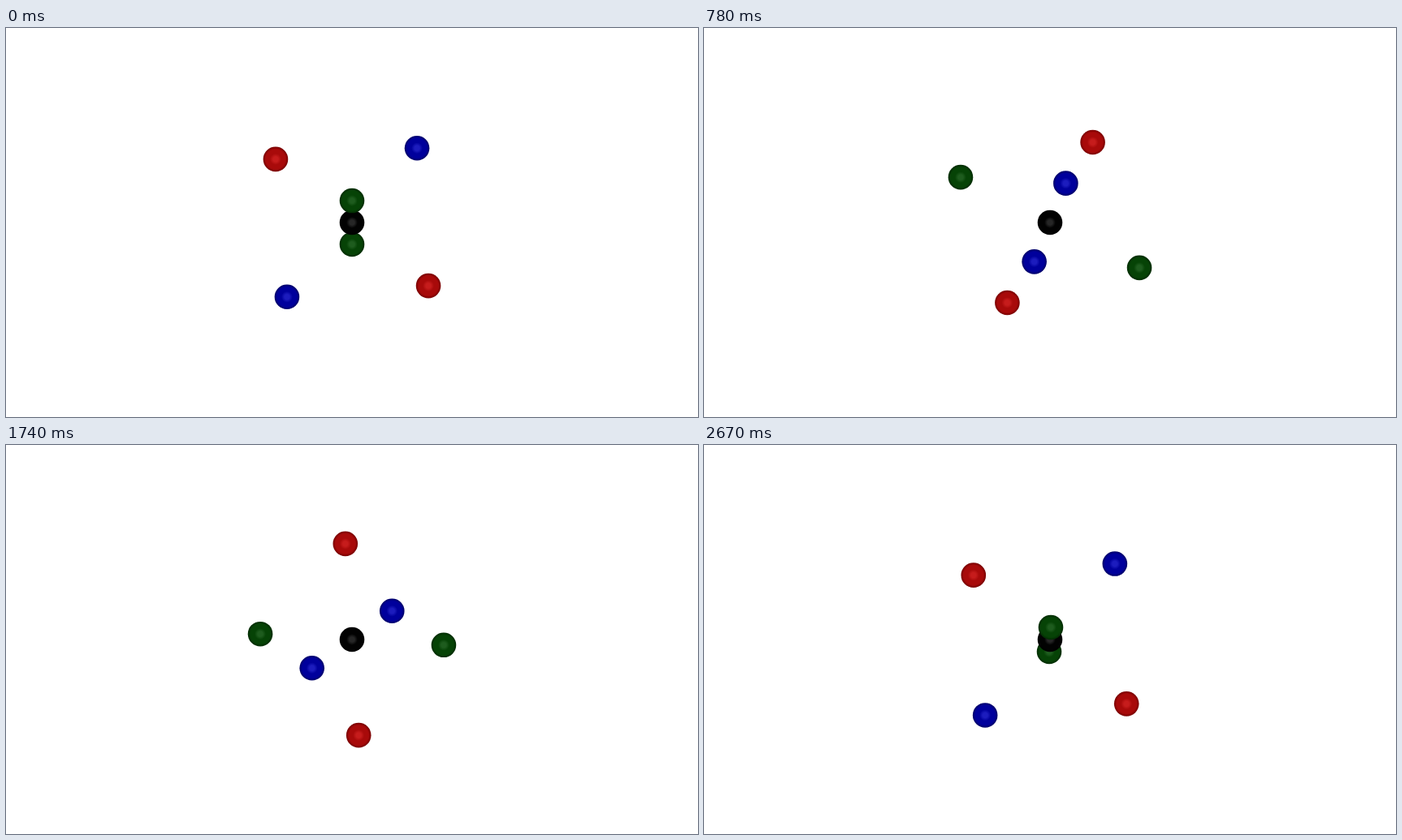
Write an HTML page with a canvas that moves like this. It is 852x480 px and loops after 2.7 s.

```html
<!DOCTYPE html>
<html lang="en">
<head>
<meta charset="utf-8">
<title>Rotating octahedron</title>
<style>
  html, body { margin: 0; width: 100%; height: 100%; overflow: hidden; background: #fff; }
  canvas { display: block; }
</style>
</head>
<body>
<canvas id="stage" width="852" height="480"></canvas>
<script>
const ctx = document.getElementById('stage').getContext('2d');
const W = 852, H = 480, ORBIT = 123.5, BALL = 15.3;
const LOOP = 2700, STEP = 30, STEPS = LOOP / STEP;

// Highlight, body and rim colour of each ball
const RED = ['#c61c1c', '#a80a0a', '#760000'];
const GREEN = ['#1e5c1e', '#064306', '#022a02'];
const BLUE = ['#1c1cbe', '#00009c', '#000066'];
const BLACK = ['#262626', '#020202', '#000000'];

// Orthographic camera: heading and elevation above the ground plane
const HEADING = 40.4 * Math.PI / 180, TILT = 77.4 * Math.PI / 180;

function project([x, y, z]) {
  const right = x * Math.cos(HEADING) + y * Math.sin(HEADING);
  const away = y * Math.cos(HEADING) - x * Math.sin(HEADING);
  return {
    x: W / 2 + ORBIT * right,
    y: H / 2 - ORBIT * (away * Math.sin(TILT) + z * Math.cos(TILT)),
    depth: z * Math.sin(TILT) - away * Math.cos(TILT)
  };
}

function ball({ x, y, tones }) {
  const [light, body, rim] = tones;
  const fill = ctx.createRadialGradient(x, y, 0, x, y, BALL);
  fill.addColorStop(0, light);
  fill.addColorStop(0.2, light);
  fill.addColorStop(0.45, body);
  fill.addColorStop(0.78, body);
  fill.addColorStop(1, rim);
  ctx.fillStyle = fill;
  ctx.beginPath();
  ctx.arc(x, y, BALL, 0, 2 * Math.PI);
  ctx.fill();
}

function draw(time) {
  const turn = Math.floor((time % LOOP) / STEP) / STEPS * 2 * Math.PI;
  const c = Math.cos(turn), s = Math.sin(turn);

  // Unit axes turned about y, then about x, by the same angle
  const axes = [
    [[c, s * s, s * c], RED],
    [[0, c, -s], BLUE],
    [[-s, c * s, c * c], GREEN]
  ];
  const balls = [{ ...project([0, 0, 0]), tones: BLACK }];
  for (const [axis, tones] of axes) {
    for (const sign of [1, -1]) {
      balls.push({ ...project(axis.map(v => v * sign)), tones });
    }
  }

  ctx.fillStyle = '#fff';
  ctx.fillRect(0, 0, W, H);
  balls.sort((a, b) => a.depth - b.depth).forEach(ball);
}

const start = performance.now();
function tick() {
  draw(performance.now() - start);
  requestAnimationFrame(tick);
}
tick();
</script>
</body>
</html>
```
